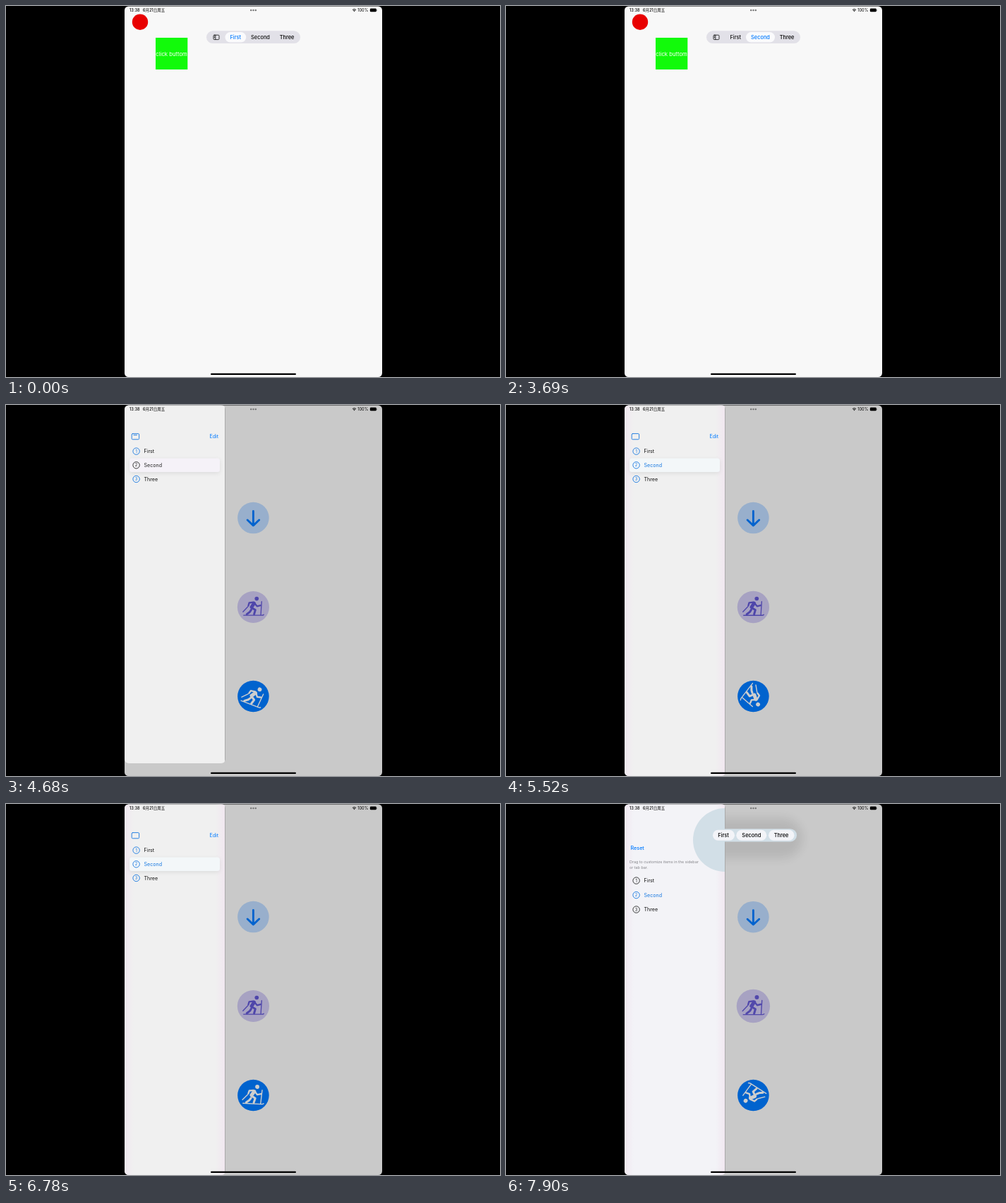
These frames come from a looping animation (700 by 526 pixels, 8000 ms). An HTML page:

```html
<!DOCTYPE html>
<html lang="en">
<head>
<meta charset="utf-8">
<style>
  html, body { margin: 0; width: 100%; height: 100%; overflow: hidden; background: #000; }
  svg { display: block; width: 700px; height: 526px; }
  text { font: 400 7.1px Inter, "Noto Sans CJK SC", sans-serif; }
  .tab text { font-size: 7.4px; font-weight: 500; text-anchor: middle; }
  .line { fill: none; stroke-linecap: round; stroke-linejoin: round; }
  .blue { fill: #007aff; }
  .row circle { fill: none; stroke: currentColor; stroke-width: .9; }
  .row text { fill: currentColor; }
  .row .digit { font-size: 5.8px; text-anchor: middle; }
  .row .label { fill: #111; }
  .row.active .label { fill: currentColor; }
</style>
</head>
<body>
<svg viewBox="0 0 700 526">
  <defs>
    <clipPath id="screen"><rect x="168" y=".5" width="365" height="525.5" rx="5.5"/></clipPath>
    <clipPath id="panelClip"><rect id="panelShape" rx="6"/></clipPath>
    <clipPath id="leftHalf"><rect x="168" width="142" height="526"/></clipPath>
    <clipPath id="rightHalf"><rect x="311" width="222" height="526"/></clipPath>
    <filter id="soft" x="-50%" y="-50%" width="200%" height="200%"><feGaussianBlur stdDeviation="3"/></filter>
    <filter id="wide" x="-50%" y="-50%" width="200%" height="200%"><feGaussianBlur stdDeviation="7"/></filter>
    <linearGradient id="edges">
      <stop offset="0" stop-color="#f1e6f0" stop-opacity=".9"/>
      <stop offset=".09" stop-color="#f1e6f0" stop-opacity="0"/>
      <stop offset=".91" stop-color="#f1e6f0" stop-opacity="0"/>
      <stop offset="1" stop-color="#f1e6f0" stop-opacity=".9"/>
    </linearGradient>
    <g id="skier" class="line" stroke="currentColor">
      <circle cx="5" cy="-12.3" r="2.9" fill="currentColor" stroke="none"/>
      <path stroke-width="1.4" d="M-14 12H12.5q1.8 0 2.7-1M-8-.5L-15 7M12.2-8L11 11"/>
      <path stroke-width="2.4" d="M0-7L-6-6.2L-7.2-2M2-5.5L5.5-1.2L10.5-2.5"/>
      <path stroke-width="5" d="M1.2-5.5L-2.5 0"/>
      <path stroke-width="3" d="M-2.5 1L3 4.2L1.2 10.5M-3 4L-5 7L-9.5 10.5"/>
    </g>
  </defs>

  <g clip-path="url(#screen)">
    <rect x="168" width="365" height="526" fill="#f8f8f8"/>

    <g id="firstPage">
      <circle cx="190" cy="22.7" r="11.2" fill="#e80000"/>
      <rect x="212" y="45" width="45.3" height="45" fill="#12fa0a"/>
      <text x="234.6" y="70.5" text-anchor="middle" fill="#fff" style="font-size:7.7px">click buttom</text>
    </g>

    <g id="secondPage">
      <g id="arrow">
        <circle r="22.3" fill="#bcd9fc"/>
        <path class="line" stroke="#007aff" stroke-width="2.9" d="M0-9.5V10M-8.3 3L0 10.8L8.3 3"/>
      </g>
      <g transform="translate(350.4 286.5)">
        <circle id="halo" fill="#cfc8f0"/>
        <use id="breather" href="#skier" color="#5a4fd0"/>
      </g>
      <g transform="translate(350.4 413)">
        <circle r="22.3" fill="#007aff"/>
        <use id="spinner" href="#skier" color="#fff"/>
      </g>
    </g>

    <g id="tabBar" class="tab">
      <rect x="284" y="35.3" width="133" height="17.8" rx="8.9" fill="#e2e1e8"/>
      <rect id="thumb" y="37" height="14.6" rx="7.3" fill="#fafafc"/>
      <g class="line" stroke="#222" stroke-width=".9">
        <rect x="294" y="41.2" width="8" height="6.4" rx="1.2"/>
        <path d="M296.8 41.2v6.4M295.2 43h.4M295.2 44.6h.4"/>
      </g>
      <text id="tabFirst" x="325.3" y="47">First</text>
      <text id="tabSecond" x="360.5" y="47">Second</text>
      <text x="398" y="47">Three</text>
    </g>

    <rect id="dim" x="168" width="365" height="526"/>

    <g id="sidebar" clip-path="url(#panelClip)">
      <rect id="panel" x="168" width="142.5" height="526"/>
      <rect id="tint" x="168" width="142" height="526" fill="url(#edges)"/>
      <rect x="310" width="1" height="526" fill="#aaa"/>
      <g id="browse">
        <rect x="175" y="77" width="128" height="20" rx="4" fill="#000" opacity=".08" filter="url(#soft)"/>
        <rect id="highlight" x="175" y="75.6" width="128" height="19.5" rx="3.5"/>
        <g class="line" stroke="#1577e0" stroke-width=".9">
          <rect x="178.2" y="40.6" width="10.4" height="8.2" rx="1.3"/>
          <path id="dash" d="M181 42.6h4.5"/>
        </g>
        <text id="edit" class="blue" x="288.5" y="47.2">Edit</text>
        <g id="rows"></g>
      </g>
      <g id="customize">
        <g class="blue" style="font-weight:500">
          <text x="176.5" y="65.4" style="font-size:7.2px;font-weight:500">Reset</text>
          <text x="301" y="65.4" text-anchor="end" style="font-size:7.2px;font-weight:500">Done</text>
        </g>
        <g fill="#85858a">
          <text x="175" y="84.4" style="font-size:5.4px">Drag to customize items in the sidebar</text>
          <text x="175" y="92.2" style="font-size:5.4px">or tab bar.</text>
        </g>
        <g id="editRows"></g>
      </g>
    </g>

    <g id="editBar" class="tab">
      <g clip-path="url(#leftHalf)"><circle cx="310" cy="51" r="45" fill="#d2dfe7"/></g>
      <g clip-path="url(#rightHalf)">
        <rect x="270" y="20" width="150" height="57" rx="28" opacity=".09" filter="url(#wide)"/>
      </g>
      <rect x="292" y="35.2" width="120" height="18.2" rx="9.1" fill="#d2dfe7"/>
      <g fill="#f3f4f8">
        <rect x="293" y="36.8" width="31" height="15" rx="7.5"/>
        <rect x="326.3" y="36.8" width="43" height="15" rx="7.5"/>
        <rect x="372" y="36.8" width="36.5" height="15" rx="7.5"/>
      </g>
      <text x="308" y="47">First</text>
      <text x="347.8" y="47">Second</text>
      <text x="390" y="47">Three</text>
    </g>

    <g id="status">
      <text x="175" y="7.8" style="font-size:5.6px;font-weight:500">13:38</text>
      <text x="194" y="7.8" style="font-size:5.5px;font-weight:500">6月21日周五</text>
      <g fill="#777"><circle cx="347.2" cy="6" r="1.2"/><circle cx="350.5" cy="6" r="1.2"/><circle cx="353.8" cy="6" r="1.2"/></g>
      <path class="line" stroke="#000" stroke-width=".9" d="M491.2 5.2q2.3-1.9 4.6 0M492.3 6.5q1.2-1 2.4 0M493.5 7.6h.1"/>
      <text x="498.3" y="7.8" style="font-size:5.6px">100%</text>
      <rect x="515.8" y="3.6" width="9" height="4.6" rx="1.3"/>
      <rect x="525.3" y="5.1" width=".7" height="1.6" fill="#555"/>
    </g>
    <rect id="home" x="290" y="520.8" width="121" height="2.3" rx="1.15"/>
  </g>
</svg>

<script>
const $ = id => document.getElementById(id);
const set = (id, attrs) => { for (const k in attrs) $(id).setAttribute(k, attrs[k]); };
const show = (id, on) => { $(id).style.display = on ? '' : 'none'; };
const lerp = (a, b, k) => a + (b - a) * k;
const clamp = k => Math.max(0, Math.min(1, k));

const LOOP = 8000, STEP = 140, SWITCH = 2700, OPEN = 4400, CUSTOMIZE = 7200;
const BLUE = '#1577e0', INK = '#222';

function addRows(id, top, gap, colors) {
  $(id).innerHTML = ['First', 'Second', 'Three'].map((name, i) => {
    const y = top + i * gap;
    return `<g class="row ${i === 1 ? 'active' : ''}" color="${colors[i]}">
      <circle cx="184.6" cy="${y}" r="4.7"/>
      <text class="digit" x="184.6" y="${y + 2.1}">${i + 1}</text>
      <text class="label" x="195.5" y="${y + 2.6}">${name}</text></g>`;
  }).join('');
}
addRows('rows', 65.6, 19.7, [BLUE, BLUE, BLUE]);
addRows('editRows', 108.6, 20.5, [INK, BLUE, INK]);

function hold(t) {
  const start = t < OPEN ? SWITCH : OPEN;
  return t < SWITCH ? t : start + Math.floor((t - start) / STEP) * STEP;
}

function drawTabs(t) {
  const k = t < SWITCH ? 0 : 1 - Math.pow(.4, (t - SWITCH) / STEP + 1);
  const slide = k > .9 ? 1 : k;
  set('thumb', { x: lerp(310.5, 340, slide), width: lerp(29.7, 41, slide) });
  set('tabFirst', { fill: t < SWITCH ? '#007aff' : '#111' });
  set('tabSecond', { fill: t < SWITCH ? '#111' : '#007aff' });
}

function drawSymbols(t) {
  const breath = (1 + Math.cos((t - 6360) / 1250 * 2 * Math.PI)) / 2;
  const swell = Math.pow(breath, 1.6), figure = Math.sqrt(breath);
  set('arrow', { transform: `translate(350.4 ${160 + .5 * swell})` });
  set('halo', { r: 22.2 + 3.8 * swell });
  set('breather', { transform: `scale(${lerp(.9, 1.05, figure)})`, opacity: lerp(1, .87, figure) });
  // Spin eases up to a steady rate.
  const age = t - 4120, ramp = 1448, rate = .187;
  const angle = age < ramp ? rate * age * age / (2 * ramp) : rate * (age - ramp / 2);
  set('spinner', { transform: `rotate(${angle + 1})` });
}

function drawSidebar(t) {
  const steps = (t - OPEN) / STEP, settled = steps >= 3;
  const grow = settled ? 1 : [0, .75, .966][steps];
  const left = lerp(284, 168, clamp(grow * 1.08));
  const edit = clamp((t - CUSTOMIZE + STEP) / (3 * STEP));
  show('sidebar', steps > 0);
  show('tabBar', steps <= 0);
  set('dim', { opacity: .193 * clamp(steps / 2) });
  set('panelShape', { x: left, y: 0, width: 311 - left, height: 526 * grow });
  set('panel', { fill: edit > .5 ? '#f3f3f7' : '#f0f0f0' });
  set('tint', { opacity: settled ? 1 : 0 });
  set('highlight', { fill: settled ? '#f3f7f9' : '#f5f2f8' });
  $('rows').children[1].setAttribute('color', settled ? BLUE : INK);
  show('dash', !settled);
  set('edit', { opacity: t >= 6920 ? .2 : 1 });
  set('browse', { opacity: 1 - edit });
  set('customize', { opacity: edit });
  set('editBar', { opacity: edit });
}

function render(now) {
  const real = now % LOOP, t = hold(real), second = real >= OPEN;
  show('firstPage', !second);
  show('secondPage', second);
  set('home', { fill: real >= 1280 && real < 3690 ? '#484848' : '#000' });
  drawTabs(t);
  if (second) {
    drawSymbols(t);
    drawSidebar(t);
  } else {
    show('sidebar', false);
    show('tabBar', true);
    set('dim', { opacity: 0 });
    set('editBar', { opacity: 0 });
  }
  requestAnimationFrame(() => render(performance.now()));
}
render(performance.now());
</script>
</body>
</html>
```
